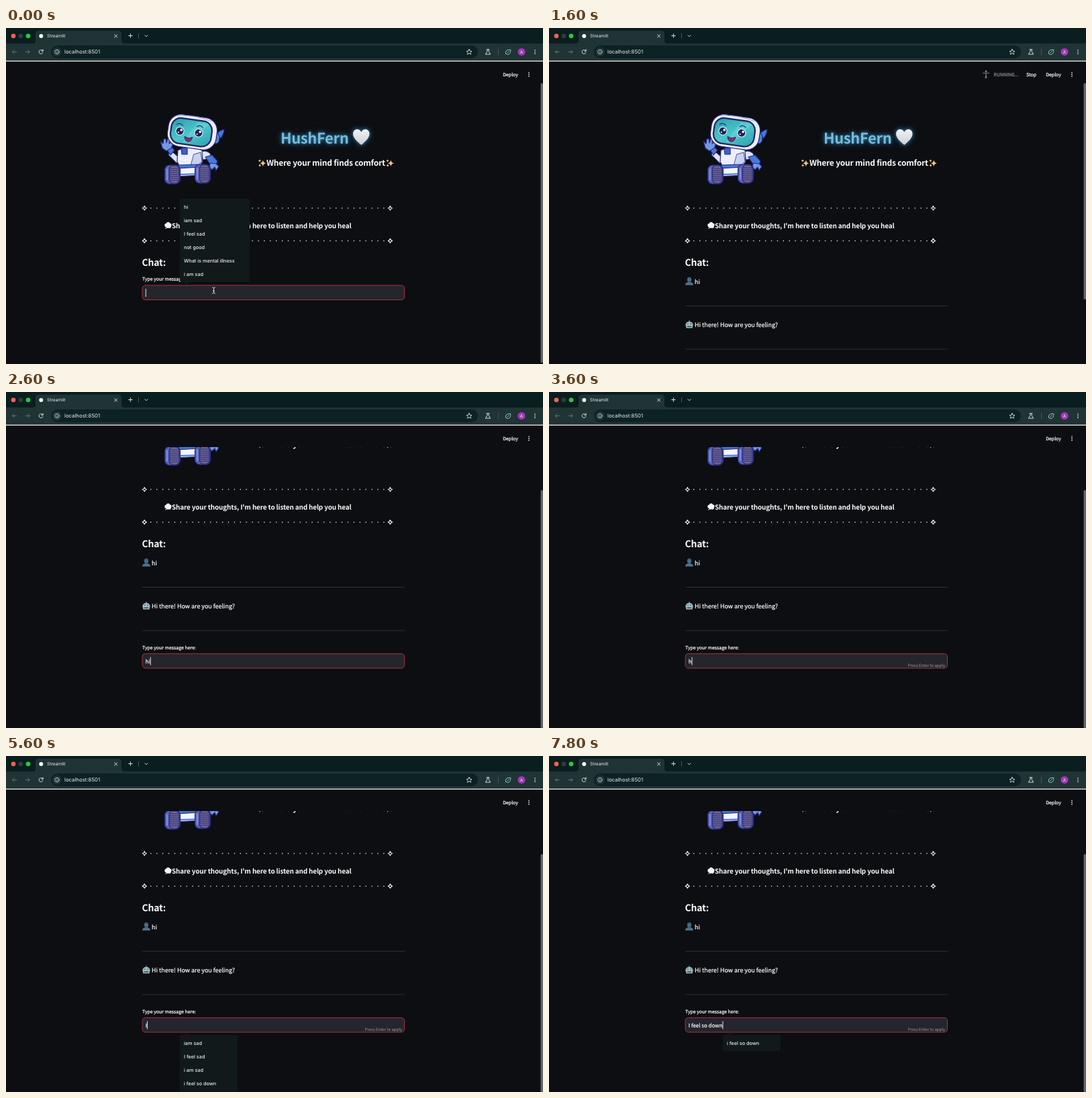
An HTML page for the animation above (8 s loop, 800 by 500 pixels).

```html
<!DOCTYPE html>
<html lang="en">
<head>
<meta charset="utf-8">
<title>Chat demo</title>
<style>
  html, body { margin: 0; width: 100%; height: 100%; overflow: hidden; background: #0d0e12; }
  svg { display: block; width: 800px; height: 500px; text-rendering: geometricPrecision; }
  text { color: #fafafa; fill: currentColor; white-space: pre; font-family: "Noto Sans CJK JP", "Noto Sans CJK SC", "Noto Sans CJK", "Noto Sans", sans-serif; }
  .bold { font-weight: 700; letter-spacing: -.015em; }
  .body { font-size: 8.95px; }
  .small { font-size: 6.96px; }
  .body, .small { stroke: currentColor; stroke-width: .22px; }
  .gray { color: #8b8c91; }
  .ui, .ui text { font-family: Inter, Roboto, sans-serif; color: #edf2f2; }
  .line { fill: none; stroke: #d5dede; stroke-linecap: round; stroke-linejoin: round; }
  .glow { filter: drop-shadow(0 0 2.5px #2f769f) drop-shadow(0 0 4px #183c54); }
  #robot { stroke: #29297f; stroke-width: 1.2; stroke-linejoin: round; stroke-linecap: round; }
</style>
</head>
<body>
<svg viewBox="0 0 800 500">
  <defs>
    <path id="spark" d="M0-5Q.7-.7 5 0Q.7.7 0 5Q-.7.7-5 0Q-.7-.7 0-5Z"/>
    <g id="sparkles" fill="#ebc884">
      <use href="#spark" transform="translate(1.3 .3) scale(.95)"/>
      <use href="#spark" transform="translate(-3.6 -3.4) scale(.45)"/>
      <use href="#spark" transform="translate(-3.4 3.6) scale(.45)"/>
    </g>
    <g id="divider" fill="none" stroke="#fafafa">
      <use href="#spark" transform="translate(206.3) scale(.7)" stroke-width="1.5"/>
      <use href="#spark" transform="translate(572.4) scale(.7)" stroke-width="1.5"/>
      <path d="M215.8 0H564" stroke-width="1.6" stroke-linecap="round" stroke-dasharray="0 8.9"/>
    </g>
    <g id="wheel">
      <rect x="-11.5" y="-14" width="23" height="28" rx="7" fill="#5561b4"/>
      <rect x="-4.5" y="-13" width="14.5" height="26" rx="5" fill="#6f6790"/>
      <path d="M-3-9H9M-4-6H9.5M-4-3H9.5M-4 0H9.5M-4 3H9.5M-4 6H9.5M-3 9H9" stroke-width="1"/>
      <path d="M-8-8V8" stroke="#8d9be0" stroke-width="1.6"/>
    </g>
    <linearGradient id="visor" x2="1" y2="1">
      <stop stop-color="#2c9cab"/><stop offset=".5" stop-color="#4cc5cb"/><stop offset="1" stop-color="#319fae"/>
    </linearGradient>
    <linearGradient id="bust" x2="0" y2="1">
      <stop stop-color="#37566f"/><stop offset="1" stop-color="#56809d"/>
    </linearGradient>
    <linearGradient id="heart" x2="0" y2="1">
      <stop stop-color="#f1f1f1"/><stop offset="1" stop-color="#cfd0d2"/>
    </linearGradient>
  </defs>

  <rect width="800" height="500" fill="#0d0e12"/>

  <g id="page">
    <g id="robot">
      <path d="M244 181L256 191L266 186L264 198L254 201L242 189Z" fill="#dfe4f8"/>
      <path d="M239 180L246 176L251 182L245 189Z" fill="#4a78dc"/>
      <path d="M230 168L234 172L235 165L238 165L239 171L241 164L244 165L243 172L247 169L249 172L246 179L239 183L233 179Z" fill="#7198e6"/>
      <path d="M290 184Q300 181 305 188L303 195L293 196Z" fill="#dfe4f8"/>
      <path d="M297 192L307 189L315 198L313 204L304 203Z" fill="#477ade"/>
      <path d="M304 201L313 202L317 206L313 212L311 207L307 211L303 207Z" fill="#7198e6"/>
      <path d="M256 182Q275 174 292 182L293 199L286 208H260L255 199Z" fill="#eceefa"/>
      <path d="M261 179L270 178V188H262Z" fill="#3764cb"/>
      <path d="M280 188L290 185L292 198L285 206L276 203Z" fill="#c9d1f0" stroke-width=".8"/>
      <path d="M256 204L288 203L288 209L257 210Z" fill="#4578dc"/>
      <path d="M253 209L289 207L291 219L252 221Z" fill="#f4f5ff"/>
      <path d="M255 218L288 217" stroke="#4578dc" stroke-width="2"/>
      <use href="#wheel" x="248" y="218"/>
      <use href="#wheel" x="293" y="217"/>
      <path d="M313 159Q318 152 325 151Q325 157 320 164Z" fill="#407bdb"/>
      <ellipse cx="313" cy="164" rx="5" ry="8" fill="#5687e4"/>
      <ellipse cx="311" cy="164" rx="3" ry="5" fill="#dfe4f8" stroke-width=".8"/>
      <g transform="rotate(8 278 155)">
        <rect x="241" y="131" width="73" height="48" rx="19" fill="#eceefa"/>
        <path d="M252 134Q277 129 303 135" stroke="#a9b3e8" stroke-width="1.4" fill="none"/>
        <rect x="245.5" y="136.5" width="61" height="38" rx="14" fill="url(#visor)" stroke="#20225f" stroke-width="2.2"/>
        <path d="M284 139L300 140L276 172L265 172Z" fill="#87dfdf" opacity=".35" stroke="none"/>
        <g fill="#1d2358" stroke="#c8f2f2" stroke-width="1.2">
          <circle cx="259" cy="156" r="6"/><circle cx="287" cy="155" r="6"/>
        </g>
        <g fill="#fff" stroke="none">
          <circle cx="261" cy="154" r="1.8"/><circle cx="289" cy="153" r="1.8"/>
          <circle cx="257" cy="158" r="1"/><circle cx="285" cy="157" r="1"/>
        </g>
        <path d="M253 147Q258 143 262 147M283 146Q288 142 292 146" fill="none"/>
        <path d="M267 163Q273 166 279 162.500Q278 170 273 170Q268 169 267 163Z" fill="#8d3058" stroke-width="1"/>
      </g>
    </g>

    <text class="bold glow" x="409" y="171.6" font-size="21.9" style="color:#76bbdb">HushFern</text>
    <path class="glow" d="M529.300 174C520.500 167 517 162 517 157.500C517 149.500 526.500 148.500 529.300 155C532 148.500 541.500 149.500 541.500 157.500C541.500 162 538 167 529.300 174Z" fill="url(#heart)"/>
    <use href="#sparkles" x="381.5" y="201"/>
    <text class="bold" x="388" y="205.3" font-size="11.94">Where your mind finds comfort</text>
    <use href="#sparkles" x="572" y="201"/>

    <use href="#divider" y="268"/>
    <g fill="#f3f5f8">
      <circle cx="239" cy="293.500" r="2.700"/><circle cx="241.500" cy="291.500" r="2.700"/><circle cx="244" cy="293" r="2.600"/>
      <circle cx="243.500" cy="295.500" r="2.400"/><circle cx="240.500" cy="295.500" r="2.400"/><circle cx="238" cy="298" r=".8"/>
    </g>
    <text class="bold" x="247" y="298" font-size="9.95">Share your thoughts, I'm here to listen and help you heal</text>
    <use href="#divider" y="316.7"/>
    <text class="bold" x="202.500" y="353.900" font-size="13.93">Chat:</text>

    <g id="chat">
      <g fill="url(#bust)">
        <ellipse cx="209" cy="374.200" rx="3.100" ry="3.700"/>
        <path d="M203 382.500Q203 379 207 378L207.500 376H210.500L211 378Q215 379 215 382.500Z"/>
      </g>
      <text class="body" x="217" y="381.2">hi</text>
      <path d="M203 413.5H594M203 478H594" stroke="#2d2e34"/>
      <g transform="translate(209 441)">
        <circle cy="-4.900" r="1.100" fill="#a4636a"/>
        <rect x="-6" y="-1.500" width="12" height="4.500" rx="1.500" fill="#56707a"/>
        <path d="M-4.800 5.400V-1Q-4.500-4 0-4Q4.500-4 4.800-1V5.400Z" fill="#a3c1c6"/>
        <path d="M-2.200-.8h.1M2.200-.8h.1" stroke="#3f6974" stroke-width="2" stroke-linecap="round"/>
        <path d="M-3.200 3.200H3.200" stroke="#3a555e" stroke-width="1.800"/>
      </g>
      <text class="body" x="217" y="445.2">Hi there! How are you feeling?</text>
    </g>

    <g id="form">
      <text class="small" x="203" y="376">Type your message here:</text>
      <rect x="203.1" y="382.9" width="390.4" height="21.6" rx="4.4" fill="#24252d" stroke="#b8363b" stroke-width=".9"/>
      <text id="entry" class="body" x="207.8" y="397.2" style="font-size:7.96px"></text>
      <rect id="caret" y="388" width=".9" height="12" fill="#fafafa"/>
      <text id="hint" x="590" y="402" font-size="5.97" text-anchor="end" style="color:#a0a1a7">Press Enter to apply</text>
    </g>
  </g>

  <rect y="49" width="800" height="33" fill="#0d0e12"/>
  <g id="running">
    <path id="runner" class="line" style="stroke:#7d7e83" stroke-width="1.2"/>
    <circle id="head" r="1.5" fill="#7d7e83"/>
    <text class="small gray" x="662.5" y="71.7">RUNNING...</text>
    <text class="small" x="711" y="71.7">Stop</text>
  </g>
  <text class="small" x="740.2" y="71.7">Deploy</text>
  <path class="line" d="M779 66.3v.01m0 2.7v.01m0 2.7v.01" stroke-width="1.8"/>
  <rect id="thumb" x="796.5" width="3.5" rx="1.5" fill="#65666a"/>

  <g id="popup" fill="#11191b">
    <path id="tip"/>
    <rect id="panel" x="259" rx="3"/>
    <g id="items" class="ui" font-size="7.3" font-weight="500"></g>
  </g>

  <path id="mouse" class="line" d="M307.6 386Q309.5 386 309.5 387.3V393.7Q309.5 395 307.6 395M311.4 386Q309.5 386 309.5 387.3M309.5 393.7Q309.5 395 311.4 395M308.4 391.2h2.2"/>

  <g id="browser">
    <rect width="800" height="23" fill="#0a1e20"/>
    <path d="M40 23Q44 23 44 19V9Q44 4 49 4H167Q172 4 172 9V19Q172 23 176 23H800V49H0V23Z" fill="#203335"/>
    <rect y="48.6" width="800" height="1.4" fill="#d9dcdc"/>
    <circle cx="11" cy="11.8" r="3.4" fill="#fe5f57"/>
    <circle cx="22" cy="11.8" r="3.4" fill="#2b3e41"/>
    <circle cx="33" cy="11.8" r="3.4" fill="#2ac840"/>
    <circle cx="52.3" cy="12" r="3" fill="#f2f4f4"/>
    <text class="ui" x="61" y="14.4" font-size="6.6">Streamlit</text>
    <rect x="67" y="26" width="636" height="19" rx="9.5" fill="#0c2224"/>
    <circle cx="76" cy="35.5" r="6.8" fill="#203335"/>
    <text class="ui" x="87" y="38.3" font-size="7.8">localhost:8501</text>
    <g class="line">
      <path d="M161.6 10l4 4m0-4l-4 4M182.6 11.5h5.6m-2.8-2.8v5.6M207 10.8l2 2l2-2"/>
      <path d="M197.5 8v7M733.5 31v9" stroke="#40575a"/>
      <path d="M15.5 35.5H9.5m2.5-2.7L9.3 35.5L12 38.2M29 35.5h6m-2.5-2.7l2.7 2.7l-2.7 2.7" stroke="#637477"/>
      <path d="M54.8 34A3 3 0 1 0 55 36.4M55.2 32v2.3h-2.3"/>
      <circle cx="76" cy="35.5" r="3.2" stroke-width=".8"/>
      <path d="M76 35.4v1.7m0-3.3v.01" stroke-width=".9"/>
      <path d="M690 31.6l1.2 2.6l2.8.3l-2.1 1.9l.6 2.8l-2.5-1.5l-2.5 1.5l.6-2.8l-2.1-1.9l2.8-.3Z" stroke-width=".9"/>
      <path d="M716 32h4m-3 0v2.7l-2.7 4.4h7.4l-2.7-4.4V32"/>
      <path d="M744.5 38.2q-1.8-6 7.3-6q.3 7.3-4.5 7.2q-3.5-.4-2.8-3.3M747 37l2.4-2.4" stroke="#85c9c7"/>
      <path d="M788 32.8v.01m0 2.7v.01m0 2.7v.01" stroke-width="1.7"/>
    </g>
    <circle cx="768" cy="35.5" r="5.6" fill="#a336b5"/>
    <text class="ui" x="768" y="37.8" font-size="6.3" text-anchor="middle">A</text>
  </g>
</svg>
<script>
const LOOP = 8000, STEP = 200;
const MESSAGE = "I feel so down";
const HISTORY = ["hi", "iam sad", "I feel sad", "not good", "What is mental illness", "i am sad", "i feel so down"];
// Each pose: head position and limbs
const POSES = [
  [651, 64.6, "M646.5 67L651 67.3L655.5 67M651 67V70.5M651 70L650 74.5M651 70L652 74.5"],
  [652.6, 64, "M651.8 66.7L650.3 70L653 71.5L652.4 74.5M650.3 70L649 72.3L646.3 72.5M647.5 69L649.2 66.8H651.8L653 69L655 69"],
  [653, 64, "M652 66.5L650.5 70L648 71.5L647 74.5M650.5 70L653.5 71.5L655 74.5M647 67.5L649.3 68.3L652 66.5L655.5 64.7"]
];
const $ = id => document.getElementById(id);
const set = (id, attrs) => Object.entries(attrs).forEach(([k, v]) => $(id).setAttribute(k, v));
const show = (id, on) => set(id, { visibility: on ? "visible" : "hidden" });
const between = (n, a, b) => n >= a && n <= b;

function typed(n) {
  if (n < 18) return "hi".slice(0, n);
  if (n < 26) return n === 18 ? "h" : "";
  return MESSAGE.slice(0, n < 29 ? 1 : n - 25);
}

function drawPopup(n, entry, inputTop) {
  const open = n < 3 || n >= 26;
  const names = open ? HISTORY.filter(s => s.toLowerCase().startsWith(entry.toLowerCase())).slice(0, 6) : [];
  const height = 4 + 20 * names.length, above = names.length === 6;
  const top = above ? inputTop - 129 : inputTop + 26;
  show("popup", open);
  set("panel", { y: top, width: above ? 104 : 86, height });
  set("tip", { d: above ? `M265 ${top + height}h8l-4 3.5Z` : `M265 ${top}h8l-4-3.5Z` });
  $("items").innerHTML = names.map((s, i) => `<text x="265" y="${top + 14.8 + 20 * i}">${s}</text>`).join("");
}

function draw(n) {
  const replied = n >= 6;
  const scroll = n < 11 ? 0 : n === 11 ? 14.5 : n === 12 ? 95 : 123;
  const shift = replied ? 129.5 : 0;
  const entry = typed(n);

  set("page", { transform: `translate(0 ${-scroll})` });
  set("form", { transform: `translate(0 ${shift})` });
  show("chat", replied);
  show("mouse", n === 0);
  show("hint", between(n, 1, 4) || n >= 18);

  $("entry").textContent = entry;
  const width = entry ? $("entry").getComputedTextLength() : 0;
  set("caret", { x: 207.8 + width });
  drawPopup(n, entry, 383 + shift - scroll);

  show("running", between(n, 5, 11) || between(n, 31, 33));
  const [x, y, limbs] = POSES[n % 5 % 3];
  set("head", { cx: x, cy: y });
  set("runner", { d: limbs });

  const [top, height] = !replied ? [82, 416] : n < 11 ? [82, 322] : n === 11 ? [82, 332] : n === 12 ? [131, 354] : [146, 354];
  set("thumb", { y: top, height });
}

let last = -1;
function tick() {
  const n = Math.floor(performance.now() % LOOP / STEP);
  if (n !== last) draw(last = n);
  requestAnimationFrame(tick);
}
tick();
</script>
</body>
</html>
```
